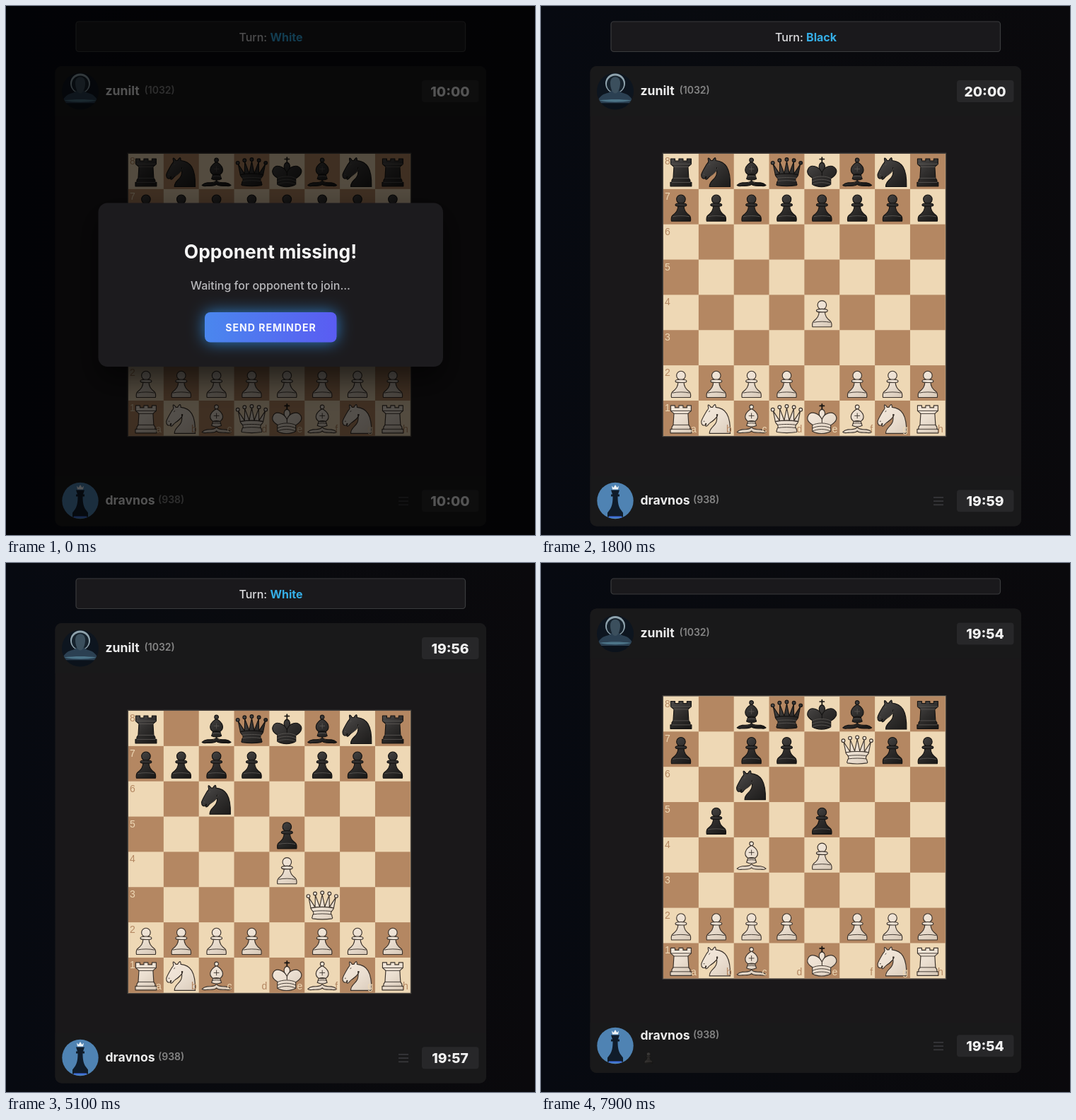
An HTML page with a canvas that plays this animation: 748x748 px, repeating every 8 s.

```html
<!DOCTYPE html>
<html lang="en">
<head>
<meta charset="utf-8">
<title>Chess game</title>
<style>
html, body { margin: 0; width: 100%; height: 100%; overflow: hidden; background: #08090d; }
canvas { display: block; width: 748px; height: 748px; }
</style>
</head>
<body>
<canvas id="stage" width="748" height="748"></canvas>
<script>
const ctx = document.getElementById('stage').getContext('2d');
const LOOP = 8000, SQ = 49.85, BX = 173;
const MODAL_END = 300, MATE = 7600;
const SANS = 'Inter, "Open Sans", sans-serif';
const LIGHT = '#eed8b5', DARK = '#b48762';

// [start, duration, from, to]
const MOVES = [
  [1200, 200, 'e2', 'e4'], [2400, 150, 'e7', 'e5'], [3150, 250, 'd1', 'f3'],
  [4800, 150, 'b8', 'c6'], [5450, 250, 'f1', 'c4'], [6650, 150, 'b7', 'b5'],
  [7400, 200, 'f3', 'f7']
];

// [time, seconds left]
const WHITE_CLOCK = [[0, 600], [1400, 1199], [2900, 1198], [3400, 1197], [5200, 1196], [5650, 1195], [7200, 1194]];
const BLACK_CLOCK = [[0, 600], [1400, 1200], [2000, 1199], [2450, 1198], [4000, 1197], [4600, 1196], [5950, 1195], [6500, 1194]];

const dot = (x, y, r) => `M${x - r} ${y}a${r} ${r} 0 1 0 ${2 * r} 0a${r} ${r} 0 1 0 ${-2 * r} 0z`;
const shape = (size, scale, bodies, lines = '') =>
  ({ size, scale, bodies: bodies.map(d => new Path2D(d)), lines: new Path2D(lines) });

const SHAPES = {
  p: shape(50, 1, [
    'M21 22C21 30 18 33 13 37C11 39 11 42 11.5 45H38.5C39 42 39 39 37 37C32 33 29 30 29 22Z',
    dot(25, 14, 6.3),
    'M17 22C17 19.8 20 19.5 25 19.5S33 19.8 33 22S30 24 25 24S17 24 17 22Z'
  ], 'M13.5 38.5C20 37 30 37 36.5 38.5'),
  r: shape(50, 1, [
    'M10.5 6.5H16.5V9.5H22V6.5H28V9.5H33.5V6.5H39.5V14L35 18L36 34L38 37V40H40V45.5H10V40H12V37L14 34L15 18L10.5 14Z'
  ], 'M11 14H39M15 18H35M14 34H36M12 40H38'),
  n: shape(45, 1.28, [
    'M22 10C32.5 11 38.5 18 38 39H15C15 30 25 32.5 23 18L24 18C24.4 20.9 18.5 25.4 16 27C13 29 13.2 31.3 11 31' +
    'C10 30 12.4 28 11 28C10 28 11.2 29.2 10 30C9 30 6 31 6 26C6 24 12 14 12 14S13.9 12.1 14 10.5' +
    'C13.3 9.5 13.5 8.5 13.5 7.5C14.5 6.5 16.5 10 16.5 10H18.5S19.3 8 21 7C22 7 22 10 22 10Z'
  ], 'M24 18C24.4 20.9 18.5 25.4 16 27M8.6 25.5h.8M14.6 15l.7-1'),
  b: shape(50, 1, [
    'M25 37C23 41.5 17 40 12 40.5C8 41 6 42.5 4.5 44C6 46 9 45.2 12 45C18 44.8 23 45.5 25 42.5' +
    'C27 45.5 32 44.8 38 45C41 45.2 44 46 45.5 44C44 42.5 42 41 38 40.5C33 40 27 41.5 25 37Z',
    'M20 29H30L32 35C28 37 22 37 18 35Z',
    'M25 11C34 16 37 24 30 29C27 28 23 28 20 29C13 24 16 16 25 11Z',
    dot(25, 8.5, 2.8)
  ], 'M19 32C22 31 28 31 31 32M25 17.5V24.5M21.5 21H28.5'),
  q: shape(45, 1.2, [
    'M9 26C17.5 24.5 30 24.5 36 26L38.5 13.5L31 25L30.7 10.9L25.5 24.5L22.5 10L19.5 24.5L14.3 10.9L14 25L6.5 13.5Z',
    'M9 26C9 28 10.5 28 11.5 30C12.5 31.5 12.5 31 12 33.5C10.5 34.5 11 36 11 36C9.5 37.5 11 38.5 11 38.5' +
    'C17.5 39.5 27.5 39.5 34 38.5C34 38.5 35.5 37.5 34 36C34 36 34.5 34.5 33 33.5C32.5 31 32.5 31.5 33.5 30' +
    'C34.5 28 36 28 36 26C27.5 24.5 17.5 24.5 9 26Z',
    dot(6, 12, 2) + dot(14, 9, 2) + dot(22.5, 8, 2) + dot(31, 9, 2) + dot(39, 12, 2)
  ], 'M11.5 30C15 29 30 29 33.5 30M12 33.5C18 32.5 27 32.5 33 33.5'),
  k: shape(45, 1.24, [
    'M22.5 25S27 17.5 25.5 14.5C25.5 14.5 24.5 12 22.5 12S19.5 14.5 19.5 14.5C18 17.5 22.5 25 22.5 25Z',
    'M11.5 37C17 40.5 27 40.5 32.5 37V30S41.5 25.5 38.5 19.5C34.5 13 25 16 22.5 23.5V27V23.5' +
    'C19 16 9.5 13 6.5 19.5C3.5 25.5 11.5 29.5 11.5 29.5Z'
  ], 'M11.5 30C17 27 27 27 32.5 30M11.5 33.5C17 30.5 27 30.5 32.5 33.5M11.5 37C17 34 27 34 32.5 37')
};
const CROSS = new Path2D('M22.5 11.6V6M20 8H25');

function blend(x0, y0, x1, y1, ...colors) {
  const g = ctx.createLinearGradient(x0, y0, x1, y1);
  colors.forEach((c, i) => g.addColorStop(i / (colors.length - 1), c));
  return g;
}
const FILLS = {
  w: blend(10, 5, 40, 42, '#f5e9dc', '#ebdfd1', '#d8c9b8'),
  b: blend(8, 5, 40, 42, '#504e4d', '#312f2e', '#191817')
};
const PAGE = blend(0, 0, 748, 0, '#070a11', '#090a0e', '#0a090c');
const BUTTON = blend(281, 0, 467, 0, '#4a87ee', '#5a5cf2');

function box(x, y, w, h, r, fill, stroke) {
  ctx.beginPath();
  ctx.roundRect(x, y, w, h, r);
  ctx.fillStyle = fill;
  ctx.fill();
  if (stroke) {
    ctx.strokeStyle = stroke;
    ctx.lineWidth = 1.2;
    ctx.stroke();
  }
}

function disc(x, y, r, fill) {
  ctx.beginPath();
  ctx.arc(x, y, r, 0, 7);
  ctx.fillStyle = fill;
  ctx.fill();
}

function text(str, x, y, font, fill, align = 'left') {
  ctx.font = font;
  ctx.fillStyle = fill;
  ctx.textAlign = align;
  ctx.fillText(str, x, y);
}

function fillPath(d, fill) {
  ctx.fillStyle = fill;
  ctx.fill(new Path2D(d));
}

function piece(code, x, y, size = SQ) {
  const [side, kind] = code, s = SHAPES[kind];
  const edge = side === 'w' ? '#3b322b' : '#141312';
  ctx.save();
  ctx.translate(x + size / 2, y + size / 2 + size * 0.01);
  ctx.scale(s.scale * size / 50, s.scale * size / 50);
  ctx.translate(-s.size / 2, -s.size / 2);
  ctx.lineWidth = 1.15 / s.scale;
  ctx.lineJoin = ctx.lineCap = 'round';
  for (const body of s.bodies) {
    ctx.fillStyle = FILLS[side];
    ctx.fill(body);
    ctx.strokeStyle = edge;
    ctx.stroke(body);
  }
  ctx.strokeStyle = side === 'w' ? edge : '#585552';
  ctx.lineWidth *= 0.8;
  ctx.stroke(s.lines);
  if (kind === 'k') {
    ctx.strokeStyle = '#14110f';
    ctx.lineWidth = 1.4;
    ctx.stroke(CROSS);
  }
  ctx.restore();
}

const squareAt = name => [name.charCodeAt(0) - 97, 8 - name[1]];

function startPosition() {
  const pos = {};
  [...'rnbqkbnr'].forEach((kind, i) => {
    const file = 'abcdefgh'[i];
    pos[file + 8] = 'b' + kind;
    pos[file + 7] = 'bp';
    pos[file + 2] = 'wp';
    pos[file + 1] = 'w' + kind;
  });
  return pos;
}

function board(t, top) {
  const pos = startPosition();
  let moving = null;
  for (const [start, dur, from, to] of MOVES) {
    if (t < start) break;
    const code = pos[from];
    delete pos[from];
    if (t >= start + dur) {
      pos[to] = code;
    } else {
      const k = 0.5 - Math.cos((t - start) / dur * Math.PI) / 2;
      const [x0, y0] = squareAt(from), [x1, y1] = squareAt(to);
      moving = [code, x0 + (x1 - x0) * k, y0 + (y1 - y0) * k];
    }
  }

  ctx.fillStyle = '#4a4540';
  ctx.fillRect(BX - 1.4, top - 1.4, SQ * 8 + 2.8, SQ * 8 + 2.8);
  ctx.fillStyle = LIGHT;
  ctx.fillRect(BX, top, SQ * 8, SQ * 8);
  ctx.fillStyle = DARK;
  for (let i = 0; i < 64; i++) {
    const c = i % 8, r = i >> 3;
    if ((c + r) % 2) ctx.fillRect(BX + c * SQ, top + r * SQ, SQ, SQ);
  }
  const put = (code, c, r) => piece(code, BX + c * SQ, top + r * SQ);
  for (const name in pos) put(pos[name], ...squareAt(name));

  const font = '14px "Liberation Sans", Arial, sans-serif';
  for (let i = 0; i < 8; i++) {
    text(8 - i, BX + 2, top + i * SQ + 15, font, i % 2 ? LIGHT : DARK);
    text('abcdefgh'[i], BX + (i + 1) * SQ - 3, top + 8 * SQ - 4.5, font, i % 2 ? DARK : LIGHT, 'right');
  }
  if (moving) put(...moving);
}

function clock(list, t, y) {
  const s = list.filter(e => e[0] <= t).pop()[1];
  const label = Math.floor(s / 60) + ':' + String(s % 60).padStart(2, '0');
  box(588, y - 15.5, 80.5, 31, 4, '#272729');
  text(label, 628, y + 7.2, '800 19.3px ' + SANS, '#f2f2f2', 'center');
}

function player(name, rating, ratingX, y) {
  text(name, 140.5, y, '700 17.6px ' + SANS, '#ececec');
  text(rating, ratingX, y - 2, '600 14px ' + SANS, '#858585');
}

function portrait(y) {
  ctx.save();
  ctx.translate(105, y);
  disc(0, 0, 26, '#0d151f');
  ctx.clip();
  disc(0, -11, 14, '#8fa3ad');
  disc(0, -10, 12, '#16222d');
  fillPath('M-24 12C-18 1-8 4-5-1H5C8 4 18 1 24 12V17H-24Z', '#2b4052');
  fillPath('M-7-12C-7-23 7-23 7-12C7-4 4 3 0 3S-7-4-7-12Z', '#3b4f5d');
  fillPath('M-23 13C-8 11 8 11 23 13C8 16-8 16-23 13Z', '#4c7488');
  fillPath('M-26 17H26V26H-26Z', '#0b121b');
  ctx.restore();
}

function badge(y) {
  ctx.save();
  ctx.translate(105, y);
  disc(0, 0, 25.7, '#4f83b3');
  ctx.clip();
  fillPath('M-6-15H6L4-9H6V-6H3.5C3.5 4 5 9 8 13L11 17V23H-11V17L-8 13C-5 9-3.5 4-3.5-6H-6V-9H-4Z', '#101c2a');
  fillPath('M-5-21L-2.5-18.5L0-22.5L2.5-18.5L5-21L4-16H-4Z', '#eef3f6');
  fillPath('M-9 22H9V24H-9Z', '#3f6fe0');
  ctx.restore();
}

function turnLabel(t) {
  const done = MOVES.filter(m => t >= m[0] + m[1]).length;
  const side = done % 2 ? 'Black' : 'White';
  const plain = '500 16px ' + SANS, bold = '700 16px ' + SANS;
  ctx.font = plain;
  const w1 = ctx.measureText('Turn: ').width;
  ctx.font = bold;
  const x = 374.5 - (w1 + ctx.measureText(side).width) / 2;
  text('Turn: ', x, 49.7, plain, '#dedee0');
  text(side, x + w1, 49.7, bold, '#35aee6');
}

function modal(t) {
  ctx.fillStyle = 'rgba(0,0,0,.65)';
  ctx.fillRect(0, 0, 748, 748);
  ctx.save();
  ctx.shadowColor = 'rgba(0,0,0,.6)';
  ctx.shadowBlur = 40;
  ctx.shadowOffsetY = 18;
  box(130.5, 278.5, 487.5, 231.5, 13, '#1c1b1e');
  ctx.restore();
  text('Opponent missing!', 374, 356.5, '700 26.4px ' + SANS, '#f6f6f6', 'center');
  text('Waiting for opponent to join...', 374, 401, '500 16px ' + SANS, '#b9b9bc', 'center');
  ctx.save();
  ctx.shadowColor = `rgba(50,150,240,${t < 100 ? 0.8 : 0.7})`;
  ctx.shadowBlur = 22;
  box(281, 433, 186.5, 42.5, 8, BUTTON);
  ctx.restore();
  ctx.letterSpacing = '1px';
  text('SEND REMINDER', 374.5, 460, '700 14.1px ' + SANS, '#f7f8ff', 'center');
  ctx.letterSpacing = '0px';
}

function draw(t) {
  const over = t >= MATE;
  const up = over ? 20.5 : 0;
  const low = over ? 682.5 : 699.5;
  const bottom = over ? 721 : 735.5;

  ctx.fillStyle = PAGE;
  ctx.fillRect(0, 0, 748, 748);
  box(99, 22, 550.5, over ? 22 : 42.5, 4, '#1a191c', '#3a3b3d');
  if (!over) turnLabel(t);

  const top = 85 - up;
  box(69.5, top, 609.5, bottom - top, 9, '#1a181a');
  box(69.5, top, 609.5, 71, [9, 9, 0, 0], '#19191a');
  box(69.5, bottom - 71, 609.5, 71, [0, 0, 9, 9], '#19191a');

  portrait(120.5 - up);
  player('zunilt', '(1032)', 195.5, 125.8 - up);
  clock(BLACK_CLOCK, t, 120.5 - up);
  board(t, 209 - up);

  badge(low);
  player('dravnos', '(938)', 215, over ? 674.3 : 705.3);
  if (over) piece('bp', 141.5, 688.5, 21);
  ctx.fillStyle = '#3a3a3d';
  for (let i = -1; i < 2; i++) ctx.fillRect(555, low + i * 5.2 - 0.2, 14, 1.6);
  clock(WHITE_CLOCK, t, low + 0.3);

  if (t < MODAL_END) modal(t);
}

const begin = performance.now();
function tick() {
  draw((performance.now() - begin) % LOOP);
  requestAnimationFrame(tick);
}
tick();
</script>
</body>
</html>
```
